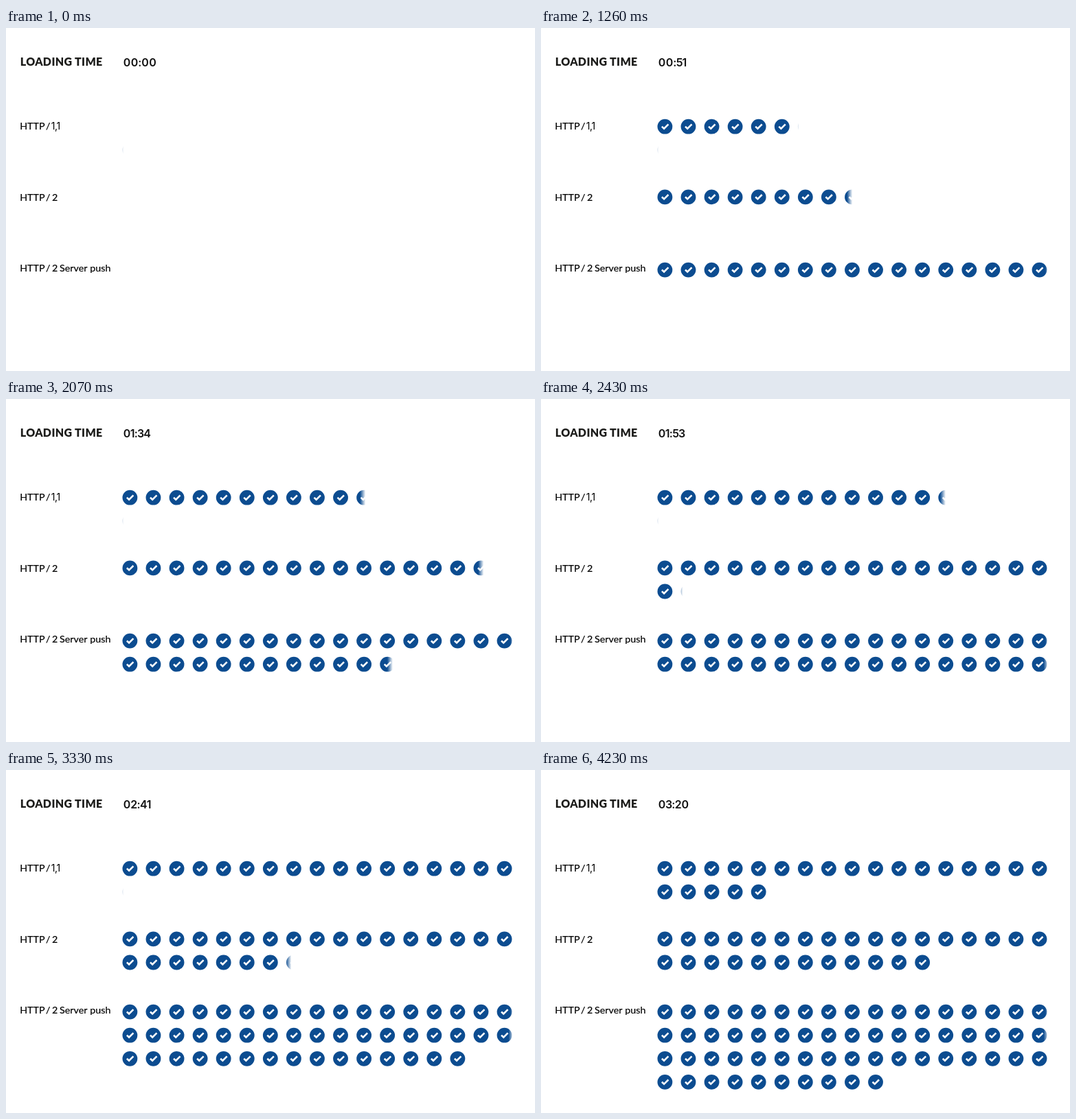
Write an HTML page that moves like this. It is 770 px wide and 500 px high and loops after 7.53 s.

```html
<!DOCTYPE html>
<html lang="en">
<head>
<meta charset="utf-8">
<title>Loading time</title>
<style>
  html, body { margin: 0; width: 100%; height: 100%; overflow: hidden; background: #fff; }
  svg { display: block; width: 770px; height: 500px; }
  text { fill: #000; stroke: #000; stroke-width: 0.2px; font: 400 14.3px Lato, sans-serif; }
  .title { fill: #1d1d1b; stroke: none; font-weight: 900; font-size: 16px; letter-spacing: 0.35px; }
  .clock { fill: #111; stroke: none; font: 600 16px Inter, sans-serif; text-anchor: middle; }
  .version { stroke: none; font-family: Inter, sans-serif; font-size: 14px; text-anchor: middle; }
</style>
</head>
<body>
<svg viewBox="0 0 770 500">
  <defs>
    <g id="icon">
      <circle r="10.9" fill="#0c4c90"/>
      <path d="M-4.5 -0.1 L-1.3 2.9 L5 -3.4" fill="none" stroke="#fff" stroke-width="2.6"/>
    </g>
    <linearGradient id="fade" gradientUnits="userSpaceOnUse" x1="0" x2="8" y1="0" y2="0">
      <stop offset="0" stop-color="#fff" stop-opacity="0"/>
      <stop offset="1" stop-color="#fff"/>
    </linearGradient>
  </defs>
  <text class="title" x="20.7" y="55">LOADING TIME</text>
  <text class="clock" id="clock" y="56"></text>
  <text y="147.5"><tspan x="20.2">HTTP</tspan> <tspan x="58">/</tspan></text>
  <text class="version" x="68.7 73 76.3" y="147.5">1,1</text>
  <text y="251.5"><tspan x="20.2">HTTP</tspan> <tspan x="58">/</tspan> <tspan x="67">2</tspan></text>
  <text y="355"><tspan x="20.2">HTTP</tspan> <tspan x="58">/</tspan> <tspan x="67">2</tspan>
    <tspan x="78">Server</tspan> <tspan x="122.3">push</tspan></text>
  <g id="rows"></g>
</svg>
<script>
const LOOP = 7530, STEP = 30, FEATHER = 8;
const COUNT_START = 300, COUNT_TIME = 3750, COUNT_END = 200;

// Each wipe moves its soft edge linearly: start/end in ms, from/to in px.
const rows = [
  { y: 143.7, icons: 17, start: 115, end: 3304, from: 166.5, to: 748.5 },
  { y: 177.7, icons: 5, start: 3340, end: 4200, from: 171, to: 340 },
  { y: 246.4, icons: 17, start: 302, end: 2243, from: 167, to: 747 },
  { y: 280.5, icons: 12, start: 2262, end: 4028, from: 167.5, to: 577.5 },
  { y: 352.6, icons: 17, start: 305, end: 1260, from: 168, to: 742 },
  { y: 386.7, icons: 17, start: 1265, end: 2430, from: 168, to: 739.5 },
  { y: 420.8, icons: 17, start: 2430, end: 3444, from: 168, to: 745 },
  { y: 454.9, icons: 10, start: 3450, end: 4050, from: 168, to: 508 }
];

const advance = { 0: 11, 1: 5.5, 2: 9.3, 3: 9, 4: 10, 5: 9.2, 6: 9.8, 7: 8.5, 8: 9.6, 9: 9.8, ':': 4.5 };
const clock = document.getElementById('clock');
const clamp01 = v => Math.min(1, Math.max(0, v));
const pad = n => String(n).padStart(2, '0');

function add(parent, name, attrs) {
  const el = document.createElementNS('http://www.w3.org/2000/svg', name);
  for (const key in attrs) el.setAttribute(key, attrs[key]);
  return parent.appendChild(el);
}

for (const row of rows) {
  const group = add(document.getElementById('rows'), 'g', { transform: `translate(0 ${row.y})` });
  for (let i = 0; i < row.icons; i++) add(group, 'use', { href: '#icon', x: 180.4 + 34.07 * i });
  row.cover = add(group, 'rect', { y: -12, width: 640, height: 24, fill: 'url(#fade)' });
}

function showClock(value) {
  const label = pad(Math.floor(value / 60)) + ':' + pad(value % 60);
  let x = 170.5;
  const centers = [...label].map(c => {
    const center = x + advance[c] / 2;
    x += advance[c];
    return center.toFixed(2);
  });
  clock.setAttribute('x', centers.join(' '));
  clock.textContent = label;
}

function draw(time) {
  const t = Math.floor((time % LOOP) / STEP) * STEP;
  showClock(Math.floor(COUNT_END * clamp01((t - COUNT_START) / COUNT_TIME)));
  for (const { cover, start, end, from, to } of rows) {
    const edge = from + (to - from) * clamp01((t - start) / (end - start));
    cover.setAttribute('transform', `translate(${edge - FEATHER} 0)`);
  }
}

const origin = performance.now();
function tick() {
  draw(performance.now() - origin);
  requestAnimationFrame(tick);
}
tick();
</script>
</body>
</html>
```
